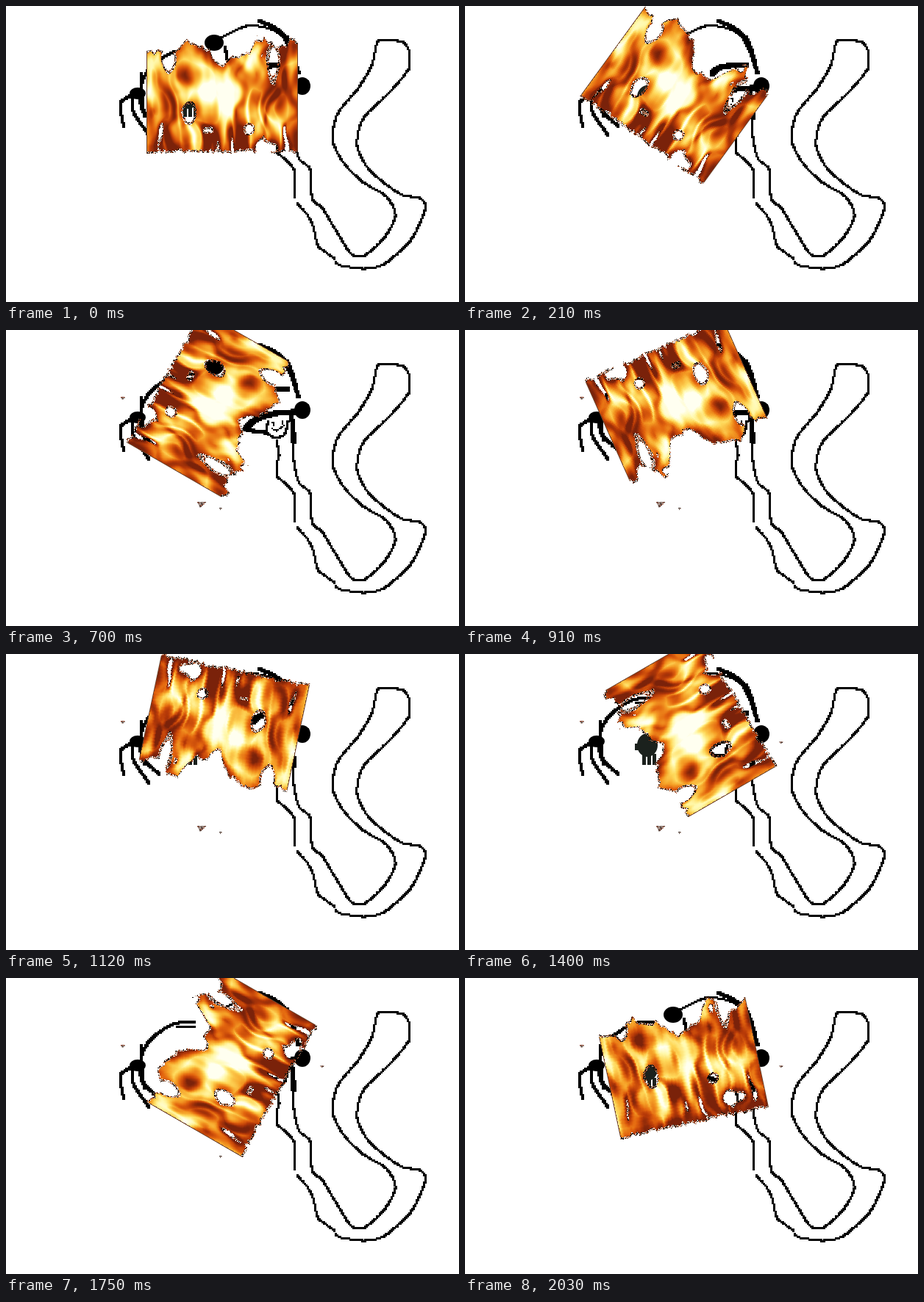
An HTML page with a canvas for the animation above (2.1 s loop, 616 px wide and 403 px high).

```html
<!DOCTYPE html>
<html lang="en">
<head>
<meta charset="utf-8">
<title>Spinning fire</title>
<style>
html, body { margin: 0; width: 100%; height: 100%; overflow: hidden; background: #fff; }
canvas { display: block; }
</style>
</head>
<body>
<canvas id="stage" width="616" height="403"></canvas>
<script>
const STEP = 70, STEPS = 30, FLICKER = 10;
const CX = 293.5, CY = 109, FW = 206, FH = 184;
const ctx = document.getElementById('stage').getContext('2d');

// Flame tongues, left to right, and holes [x, y, rx, ry], both from the flame centre
const tongues = [56, 50, 68, 60, 32, 40, 71, 56, 67];
const holes = [[-44, 37, 6, 13], [69, -35, 6, 19], [37, 57, 7, 7], [-74, -36, 7, 15]];
const ramp = [[122, 34, 10], [184, 58, 8], [226, 100, 14], [245, 160, 38], [254, 216, 90], [255, 248, 170], [255, 255, 240]];

// Embers left behind: x, y, size, first and last step
const embers = [[159, 93, 6, 4, 29], [266, 238, 12, 5, 22], [292, 243, 4, 4, 25], [430, 120, 5, 19, 29]];

const hash = (x, y) => {
  let h = Math.imul(x | 0, 374761393) + Math.imul(y | 0, 668265263);
  h = Math.imul(h ^ (h >>> 13), 1274126177);
  return ((h ^ (h >>> 16)) >>> 0) / 4294967296;
};
const mix = (a, b, k) => a + (b - a) * k;
const clamp = v => Math.max(0, Math.min(1, v));
const ease = u => u * u * (3 - 2 * u);

function noise(x, y) {
  const i = Math.floor(x), j = Math.floor(y), u = ease(x - i), v = ease(y - j);
  return mix(mix(hash(i, j), hash(i + 1, j), u), mix(hash(i, j + 1), hash(i + 1, j + 1), u), v);
}

function layer(w, h) {
  const c = document.createElement('canvas');
  c.width = w;
  c.height = h;
  return c;
}

function spline(a, b, c, d, t) {
  const m = (c - a) * .4, n = (d - b) * .4, s = t * t, q = s * t;
  return (2 * q - 3 * s + 1) * b + (q - 2 * s + t) * m + (3 * s - 2 * q) * c + (q - s) * n;
}

// Curve through a few points, stamped on a coarse pixel grid
function line(g, text, size = 3) {
  const p = text.split(' ').map(s => s.split(',').map(Number));
  const snap = v => Math.round(v / 2) * 2 - (size >> 1);
  for (let i = 0; i < p.length - 1; i++) {
    const q = [p[Math.max(0, i - 1)], p[i], p[i + 1], p[Math.min(p.length - 1, i + 2)]];
    const n = Math.ceil(Math.hypot(q[2][0] - q[1][0], q[2][1] - q[1][1]));
    for (let k = 0; k <= n; k++) {
      const [x, y] = [0, 1].map(j => spline(q[0][j], q[1][j], q[2][j], q[3][j], k / n));
      g.fillRect(snap(x), snap(y), size, size);
    }
  }
}

function blob(g, x, y, rx, ry) {
  g.beginPath();
  g.ellipse(x, y, rx, ry, 0, 0, 7);
  g.fill();
}

function drawing() {
  const c = layer(616, 403), g = c.getContext('2d');
  g.fillStyle = '#fff';
  g.fillRect(0, 0, 616, 403);
  g.fillStyle = '#000';
  // tail and legs
  line(g, '524,46 505,48 497,80 478,112 450,147 444,183 460,215 486,240 517,259 529,285 513,316 487,339 469,337 450,308 430,275 416,262 413,222 398,207 391,178 388,135');
  line(g, '524,46 540,49 547,60 547,85 520,118 485,153 477,190 495,224 535,255 564,262 569,278 550,318 515,350 488,357 455,353 447,347');
  line(g, '446,343 424,326 418,302 410,285 395,268');
  line(g, '392,260 392,240 391,222 380,209 368,198 368,180 371,170 367,150');
  // head
  line(g, '255,60 230,62 208,74 192,90 183,108', 4);
  line(g, '255,66 232,66');
  line(g, '278,52 297,40 332,26 374,39 397,90');
  line(g, '344,20 362,28 384,47 397,90', 5);
  blob(g, 283, 50, 13, 11);
  line(g, '298,55 302,76 314,98 332,102', 4);
  line(g, '335,91 350,82 382,80', 7);
  // hand
  line(g, '184,92 184,112 188,150', 4);
  blob(g, 179, 119, 11, 8);
  line(g, '178,118 156,132 160,164', 4);
  line(g, '173,124 173,144 194,175', 4);
  line(g, '181,124 187,144 208,163', 4);
  // hat and small face
  line(g, '325,134 340,121 366,113 386,112 408,104', 7);
  line(g, '324,134 340,138 352,139', 5);
  blob(g, 403, 109, 11, 12);
  line(g, '387,112 390,130 392,152', 6);
  line(g, '356,124 354,138 365,146 378,142 383,124');
  line(g, '363,126 363,129', 2);
  line(g, '375,123 375,127', 2);
  line(g, '361,133 368,137 378,130', 2);
  // dark creature
  g.fillStyle = '#1b211d';
  blob(g, 248, 124, 14, 16);
  g.fillRect(231, 122, 12, 9);
  for (let x = 241; x < 260; x += 7) g.fillRect(x, 136, 5, 15);
  return c;
}

function tongue(x, wobble) {
  const u = x / FW * (tongues.length - 1), i = Math.floor(u);
  const high = mix(tongues[i], tongues[i + 1], ease(u - i));
  return high + (noise(x * .05, wobble) - .5) * 14 + (noise(x * .2, wobble + 9) - .5) * 9;
}

// Distance inside the flame edge, negative outside
function depth(x, y, rim, rise, fine) {
  const lx = x - FW / 2, ly = y - FH / 2;
  let d = Math.min(rim + ly, FH - y - 1 - noise(x * .3, 5) * 5);
  for (const [hx, hy, rx, ry] of holes) {
    const q = Math.hypot((lx - hx) / rx, (ly - hy + rise) / ry);
    d = Math.min(d, (q - 1) * rx + (fine - .5) * 7);
  }
  return Math.min(d, (fine - .13) * 45 + 20 * clamp(1 - Math.abs(ly) / 60));
}

function heat(x, y, d, rise, fine, glow) {
  const lx = x - FW / 2, ly = y - FH / 2, bend = noise(x * .03, y * .025 + rise) * 1.6;
  const broad = noise(x * .045 + bend, y * .02 + rise + 7);
  const thread = 1 - Math.abs(noise(x * .085 + bend * 1.3 + 70, y * .025 + rise) * 2 - 1);
  const halo = Math.exp(-((lx + 3) ** 2 / 1700 + (ly - 8) ** 2 / 900));
  const dark = .28 * clamp((ly - 35) / 45) + .2 * clamp(1 - d / 14) + .12 * clamp((Math.abs(lx) - 60) / 30);
  return clamp(.5 + (broad - .5) * .75 + (fine - .5) * .6 + (thread - .6) * .55 + halo * glow - dark);
}

function shade(v) {
  v *= ramp.length - 1;
  const i = Math.min(ramp.length - 2, Math.floor(v));
  return ramp[i].map((w, j) => mix(w, ramp[i + 1][j], v - i));
}

// The flame rises through a short flicker, then starts over
function flame(phase) {
  const c = layer(FW, FH), g = c.getContext('2d'), img = g.createImageData(FW, FH);
  const k = phase / FLICKER, lift = 28 * k * k, rise = lift * .03, glow = .5 - .35 * k * k;
  for (let x = 0; x < FW; x++) {
    const rim = tongue(x, k * 3);
    for (let y = 0; y < FH; y++) {
      const fine = noise(x * .1 + noise(x * .04, y * .04 + rise) * 2 + 30, y * .04 + rise);
      const d = depth(x, y, rim, lift, fine), r = hash(x, y + phase * 97);
      if (d < 0 || (d < 3 && r < .3)) continue;
      let rgb = shade(heat(x, y, d, rise, fine, glow));
      if (d < 3) rgb = r < .58 ? [24, 16, 12] : r < .8 ? [176, 140, 116] : [176, 72, 28];
      if (x === 0 || x === FW - 1) rgb = [110, 62, 36];
      img.data.set([...rgb, 255], (y * FW + x) * 4);
    }
  }
  g.putImageData(img, 0, 0);
  return c;
}

function ember(x, y, size) {
  for (let j = 0; j < size * .6; j++) {
    for (let i = 0; i < size - j * 1.6; i++) {
      const r = hash(x + i, y + j);
      ctx.fillStyle = r < .5 ? '#3a2a24' : r < .8 ? '#b09a90' : '#a4482c';
      ctx.fillRect(x - size / 2 + i + j * .5, Math.round(y - size * .3) + j, 1, 1);
    }
  }
}

const back = drawing();
const flames = Array.from({ length: FLICKER }, (_, i) => flame(i));

function frame() {
  const step = Math.floor(performance.now() / STEP) % STEPS;
  ctx.drawImage(back, 0, 0);
  for (const [x, y, size, from, to] of embers) if (step >= from && step <= to) ember(x, y, size);
  ctx.save();
  ctx.imageSmoothingEnabled = false;
  ctx.translate(CX, CY);
  ctx.rotate(step * Math.PI * 2 / STEPS);
  ctx.drawImage(flames[step % FLICKER], -FW / 2, -FH / 2 + 1);
  ctx.restore();
  requestAnimationFrame(frame);
}
frame();
</script>
</body>
</html>
```
